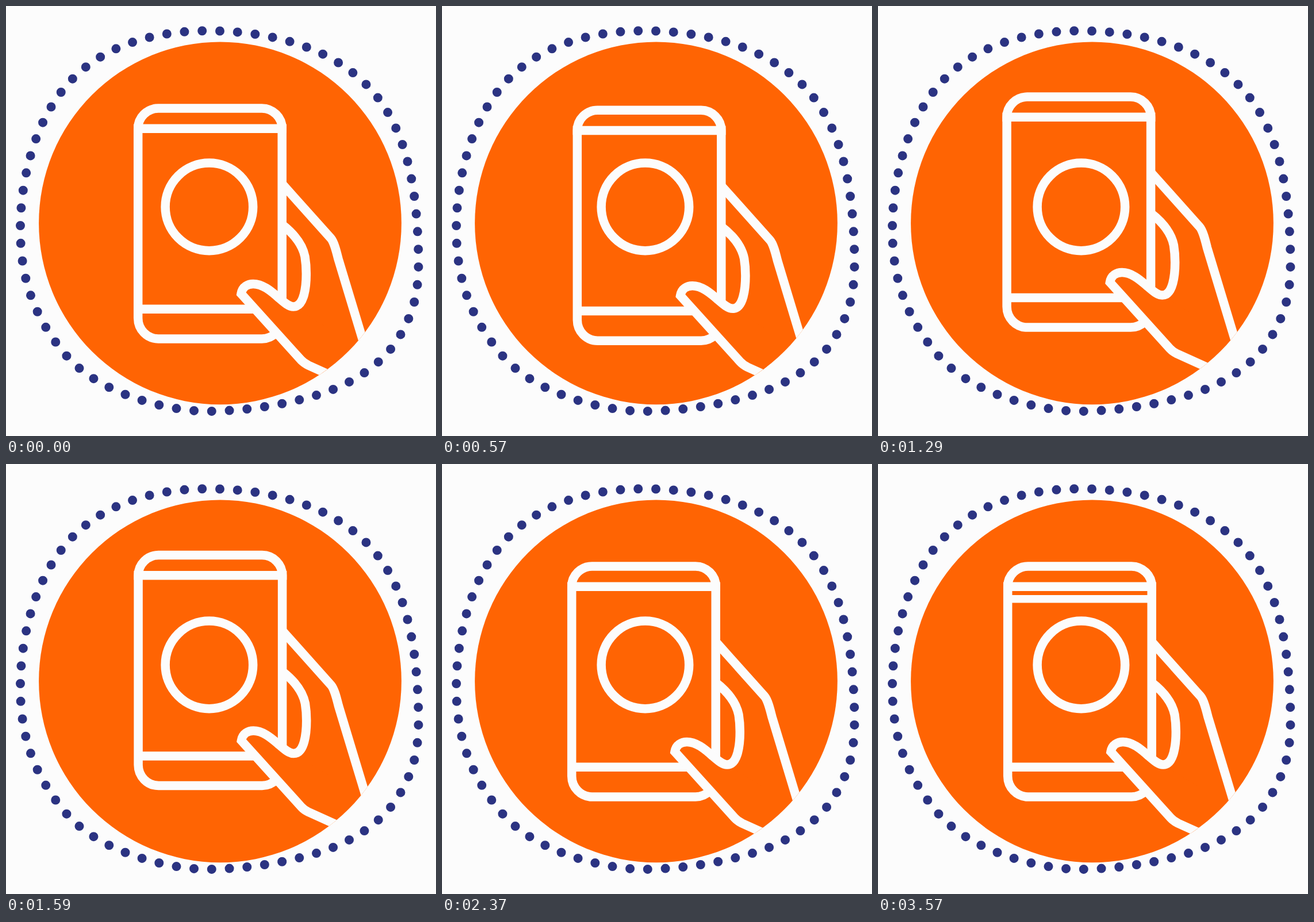
An HTML page that plays this animation: 748x748 px, repeating every 3600 ms.

```html
<!DOCTYPE html>
<html>
<head>
<meta charset="utf-8">
<style>
  html, body { margin: 0; height: 100%; overflow: hidden; background: #fcfcfc; }
  svg { display: block; width: 748px; height: 748px; }
  .line { fill: none; stroke: #fcfcfc; stroke-width: 15.5; }
  .skin { fill: #ff6403; }
  .dots { fill: none; stroke: #2b3382; stroke-width: 16; stroke-linecap: round; stroke-dasharray: 0 1; }
</style>
</head>
<body>
<svg viewBox="0 0 748 748">
  <clipPath id="disc"><circle cx="372.5" cy="377.8" r="315.4"/></clipPath>
  <circle class="skin" cx="372.5" cy="377.8" r="315.4"/>
  <path class="dots" pathLength="71" d="M372 43.5C465 47 561 71 627 137S711 302 716 394S715 522 685 574S596 661 537 678S416 704 354 705S165 679 104 607S24 464 25 382S50 194 115.5 127S279 40 372 43.5"/>
  <g clip-path="url(#disc)">
    <g id="phone">
      <g class="line">
        <path d="M229.7 213A35.5 35 0 0 1 265 178H445A35.5 35 0 0 1 480.2 213V543A35.5 36 0 0 1 445 579H265A35.5 36 0 0 1 229.7 543Z"/>
        <path d="M222 213.2H488M230 527.3H440"/>
      </g>
      <path class="skin" d="M409 500.5C411 488 421 483.5 430 483.5C447 483.5 462 497 472 505.5C482 514 491 523 500 523L560 560V646L513 615.5Z"/>
      <g class="line">
        <path d="M640 676.5L526 625Q518 621 513 615.5L409 500.5C411 488 421 483.5 430 483.5C447 483.5 462 497 472 505.5C482 514 491 523 500 523C519 523 522.3 487 522.3 466C522.3 455 521.5 445 520 436C516 416 502 397 480 380"/>
        <path d="M480 309L565 404C571 411 575 428 578 440L653 688"/>
      </g>
    </g>
    <circle class="line" cx="353.4" cy="349.4" r="76.3"/>
    <rect id="scan" x="230" width="242" height="13.5" fill="#fcfcfc"/>
  </g>
</svg>
<script>
const LOOP = 3600, STEP = 30, SCAN_START = 2760;
const phone = document.getElementById("phone");
const scan = document.getElementById("scan");

// The hand sways while aiming, then settles: [ms, dx, dy].
const poses = [
  [0, 0, 0], [240, 1, 29], [470, 12.5, 2], [570, 5.6, 3.3], [790, -11, 26],
  [1050, -19.7, -1.1], [1400, 0, -23.5], [1590, 0.4, -19.4], [2070, -3.7, 10.6], [2370, -4, 0]
];

const slope = (a, b, axis) => (b[axis] - a[axis]) / (b[0] - a[0]);

// Velocity at pose k: the neighbouring slopes, the shorter side counting more.
function velocity(k, axis) {
  const [a, b, c] = [poses[k - 1], poses[k], poses[k + 1]];
  if (!a) return slope(b, c, axis);
  if (!c) return slope(a, b, axis);
  return (slope(a, b, axis) * (c[0] - b[0]) + slope(b, c, axis) * (b[0] - a[0])) / (c[0] - a[0]);
}

function sway(t, axis) {
  const end = poses.findIndex(pose => pose[0] >= t);
  if (end < 0) return poses.at(-1)[axis];
  const k = Math.max(end - 1, 0), a = poses[k], b = poses[k + 1];
  const span = b[0] - a[0], s = (t - a[0]) / span, r = 1 - s;
  return a[axis] * r * r * (1 + 2 * s) + b[axis] * s * s * (3 - 2 * s) +
    span * s * r * (velocity(k, axis) * r - velocity(k + 1, axis) * s);
}

// The scan line runs down to the lower bar and back up.
const scanY = t => Math.min(226 + (t - SCAN_START) * 0.696, 512, 228 + (LOOP - STEP - t) * 0.745);

function draw(now) {
  const t = Math.floor(now % LOOP / STEP) * STEP;
  phone.setAttribute("transform", `translate(${sway(t, 1)} ${sway(t, 2)})`);
  scan.setAttribute("y", scanY(t));
  scan.style.display = t < SCAN_START ? "none" : "";
  requestAnimationFrame(draw);
}
draw(0);
</script>
</body>
</html>
```
